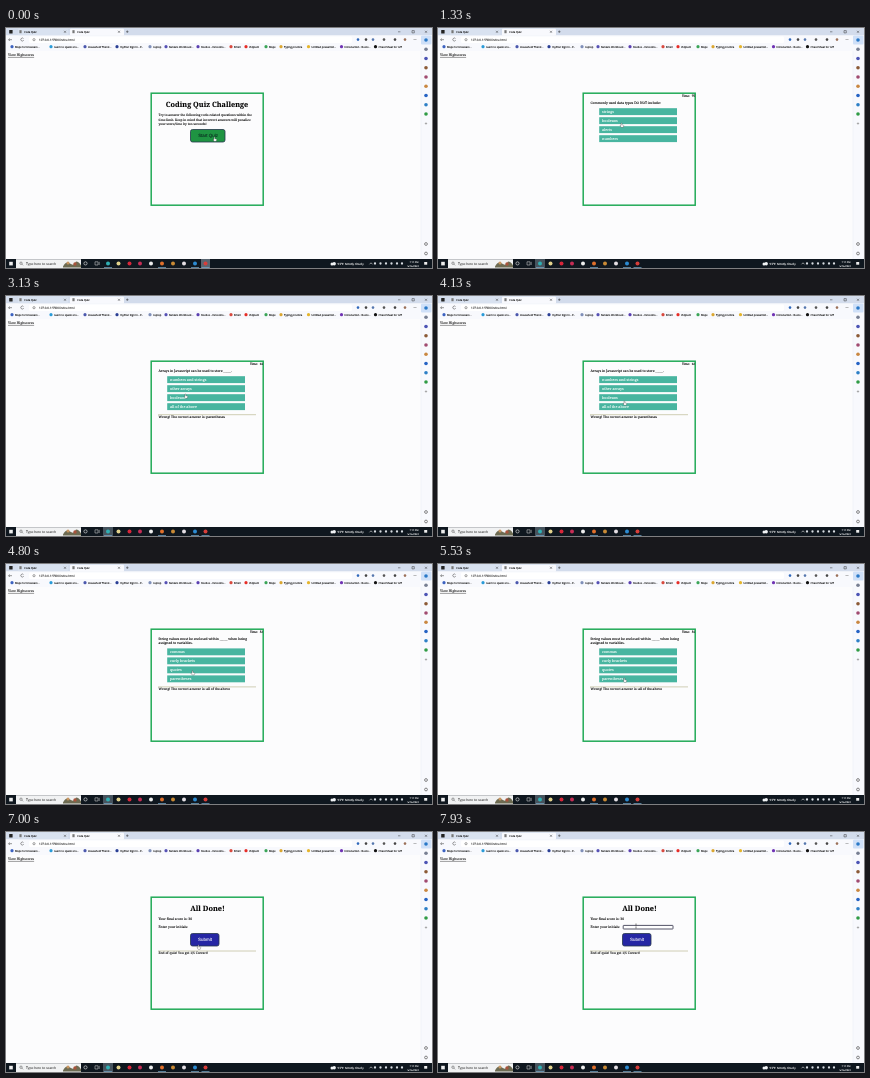
An HTML page for the animation above (8000 ms loop, 426 by 240 pixels).

```html
<!DOCTYPE html>
<html lang="en">
<head>
<meta charset="utf-8">
<title>Code Quiz</title>
<style>
  html, body { margin: 0; width: 100%; height: 100%; overflow: hidden; background: #fcfcfd; }
  svg { display: block; width: 100vw; height: 100vh; }
  text { font-family: "Noto Serif", Georgia, serif; text-rendering: geometricPrecision; white-space: pre; stroke-width: 0.09px; }
  .ui { font-family: "Open Sans", "Noto Sans", sans-serif; }
  .button { font-family: "Liberation Sans", Arial, sans-serif; }
  .title { font-weight: 700; }
</style>
</head>
<body>
<svg id="stage" viewBox="0 0 426 240" preserveAspectRatio="none"></svg>
<script>
const NS = 'http://www.w3.org/2000/svg';
const stage = document.getElementById('stage');
const LOOP = 8000;

function add(parent, tag, attrs = {}, content) {
  const node = document.createElementNS(NS, tag);
  for (const key in attrs) node.setAttribute(key, attrs[key]);
  if (content !== undefined) node.textContent = content;
  parent.appendChild(node);
  return node;
}
const group = parent => add(parent, 'g');
const rect = (p, x, y, width, height, fill, more) => add(p, 'rect', { x, y, width, height, fill, ...more });
const dot = (p, cx, cy, r, fill) => add(p, 'circle', { cx, cy, r, fill });
const ring = (p, cx, cy, r, stroke, width = 0.5) =>
  add(p, 'circle', { cx, cy, r, stroke, 'stroke-width': width, fill: 'none' });
const line = (p, d, stroke, width = 0.5, more) =>
  add(p, 'path', { d, stroke, 'stroke-width': width, fill: 'none', ...more });
const text = (p, x, y, size, str, fill = '#000', more) =>
  add(p, 'text', { x, y, 'font-size': size, fill, stroke: fill, ...more }, str);
const label = (p, x, y, str, fill = '#111', size = 2.6) => text(p, x, y, size, str, fill, { class: 'ui' });
const show = (node, on) => node.setAttribute('display', on ? 'inline' : 'none');

function drawBrowser() {
  const g = group(stage);
  rect(g, 0, 0, 426, 240, '#fcfcfd');
  rect(g, 0, 0, 426, 7.5, '#d3dcec');
  rect(g, 12, 0.8, 50, 6.7, '#d9e2f0', { rx: 1 });
  rect(g, 64, 0.8, 54, 6.9, '#f8f9fd', { rx: 1 });
  rect(g, 0, 7.5, 426, 15.5, '#f8f9fd');
  rect(g, 3.2, 2, 3.4, 3.4, '#222', { rx: 0.5 });
  for (const x of [14, 67]) {
    rect(g, x - 0.6, 2.2, 2.2, 3, '#777');
    label(g, x + 4, 4.8, 'Code Quiz');
  }
  for (const x of [59, 113, 420]) line(g, `M${x - 1} 2.8l2 2m0-2l-2 2`, '#222', 0.45);
  line(g, 'M120 3.7h2.6m-1.3-1.3v2.6M392 3.8h2.4M406 2.6h2.3v2.3h-2.3z', '#222', 0.45);

  rect(g, 23, 8.5, 323, 6.4, '#fff', { rx: 1.5 });
  line(g, 'M6 11.7h-3.4l1.2-1.2m-1.2 1.2l1.2 1.2M17.5 10.6a1.5 1.5 0 1 0 .2 1.6', '#333', 0.5);
  ring(g, 28, 11.7, 1.1, '#444');
  label(g, 33, 12.8, '127.0.0.1:5500/index.html', '#333', 2.95);
  [[352, '#2f68bb'], [360, '#444'], [367, '#5577ae'], [378, '#555'], [389, '#444'], [399, '#9a7058']]
    .forEach(([x, c]) => dot(g, x, 11.6, 1.3, c));
  for (let i = 0; i < 3; i++) dot(g, 408 + i, 11.6, 0.4, '#333');

  [
    [9, 'Maps for browsers...', '#3c62c0'], [48, 'Learn to speak a la...', '#2a9bd8'],
    [82, 'Household Thank...', '#4b58ad'], [114, 'myPlan Sign In - P...', '#2a3f94'],
    [147, 'Laptop', '#7f8fb8'], [163, 'Renters Workbook...', '#5651b4'],
    [195, 'Studios - Innovatio...', '#5a3fb0'], [228, 'Email', '#d84a3f'],
    [243, 'Vidplum', '#e62d27'], [263, 'Maps', '#3aa557'],
    [278, 'Typing practice', '#dba731'], [305.5, 'Untitled presentati...', '#e5b52c'],
    [338.5, 'Introduction · Boots...', '#7033b4'], [372.5, 'Cheat Sheet for GIT', '#111']
  ].forEach(([x, name, color]) => {
    dot(g, x - 3, 18.7, 1.6, color);
    label(g, x, 19.7, name);
  });

  rect(g, 415, 7.5, 11, 223.5, '#f8f9fd');
  rect(g, 414.8, 22.7, 0.4, 208.3, '#e4e8f2');
  rect(g, 415, 7.5, 10.5, 9, '#cfe0f8', { rx: 1 });
  ['#2978c7', '#777f92', '#4b53b4', '#8b5a36', '#a04a70', '#c98740', '#2462c4', '#2c7fc6', '#2f9b45']
    .forEach((color, i) => dot(g, 420, 12 + i * 9.25, 1.8, color));
  line(g, 'M418.8 95.5h2.4m-1.2-1.2v2.4', '#777', 0.5);
  for (const y of [216, 225.5]) ring(g, 420, y, 1.4, '#555', 0.7);

  text(g, 2, 28, 3.3, 'View Highscores', '#222', { 'text-decoration': 'underline' });
}

function drawTaskbar() {
  const g = group(stage);
  rect(g, 0, 231, 426, 9, '#0f171f');
  rect(g, 3.2, 233.8, 3.6, 3.6, '#eee');
  rect(g, 10, 231.2, 65, 8.8, '#f1f2f3');
  ring(g, 15, 235.2, 1.2, '#333', 0.45);
  line(g, 'M15.9 236.1l1.2 1.2', '#333', 0.45);
  label(g, 20, 236.7, 'Type here to search', '#444', 3.3);
  add(g, 'path', { d: 'M57 238.5q3-6 7-3t6-2q3 0 5 4v2H57z', fill: '#6d6b52' });
  dot(g, 62, 235, 1.5, '#c79560');
  dot(g, 69, 236, 1.7, '#a8533c');

  const recorder = rect(g, 195, 231, 9, 9, '#596570');
  const browser = rect(g, 97, 231, 10, 9, '#47545e');
  ring(g, 79.5, 235.4, 1.6, '#eee', 0.6);
  line(g, 'M89 233.8h3v3.2h-3zM93.2 233.8v3.2', '#ddd', 0.5);
  [[102, '#2fb0b4'], [112.5, '#e3d38c'], [123.5, '#d8263a'], [134, '#c62d55'], [145, '#eee'],
   [156, '#e0702b'], [167, '#c98a35'], [178, '#e4dfe4'], [189, '#2c8bd2'], [199.5, '#d73e39']]
    .forEach(([x, c]) => dot(g, x, 235.4, 2, c));
  for (const x of [102, 156, 189, 199.5]) rect(g, x - 4, 239.3, 8, 0.7, '#76a9cc');

  dot(g, 326, 236, 1.5, '#f1f3f5');
  dot(g, 328.2, 235.7, 1.7, '#f1f3f5');
  label(g, 331.5, 236.5, '53°F  Mostly cloudy', '#fff', 2.9);
  line(g, 'M363.5 236.3l1.5-1.5 1.5 1.5', '#eee', 0.6);
  [369, 374.5, 380, 385.5, 391, 396].forEach(x => dot(g, x, 235.5, 1.15, '#d8dde2'));
  label(g, 403.5, 234.7, '7:11 PM', '#fff', 2.4);
  label(g, 401.5, 238.5, '5/16/2022', '#fff', 2.4);
  rect(g, 418.2, 234, 3, 2.7, '#eee');
  return { recorder, browser };
}

function drawIntro() {
  const g = group(stage);
  text(g, 201, 78.8, 7.25, 'Coding Quiz Challenge', '#000', { class: 'title', 'text-anchor': 'middle' });
  ['Try to answer the following code-related questions within the',
   'time limit. Keep in mind that incorrect answers will penalize',
   'your score/time by ten seconds!']
    .forEach((row, i) => text(g, 152.5, 88.4 + i * 4.3, 3.2, row));
  drawButton(g, 35, '#1f9442', '#0b2d22', 'Start Quiz');
  return g;
}

function drawButton(g, width, fill, ink, name) {
  rect(g, 184.5, 101.5, width - 0.5, 12.5, fill, { rx: 2, stroke: '#25364c', 'stroke-width': 0.8 });
  text(g, 184.5 + width / 2, 109.4, 4.45, name, ink, { class: 'button', 'text-anchor': 'middle' });
}

function drawFeedback(g, y, message) {
  line(g, `M152 ${y}H250`, '#a9a878', 0.55);
  text(g, 152.5, y + 3.2, 3.25, message);
}

function drawQuestion({ lines, choices, feedback }) {
  const g = group(stage);
  lines.forEach((row, i) => text(g, 152.5, 75.5 + i * 4.3, 3.35, row));
  const top = 80.2 + (lines.length - 1) * 4.2;
  choices.forEach((name, i) => {
    const y = top + i * 9;
    rect(g, 161.2, y, 77.8, 6.9, '#48b5a0');
    text(g, 164, y + 4.7, 3.7, name, '#f4fdfa');
  });
  if (feedback) drawFeedback(g, top + 38.5, feedback);
  return g;
}

function drawResult() {
  const g = group(stage);
  text(g, 201.5, 78.8, 7.35, 'All Done!', '#000', { class: 'title', 'text-anchor': 'middle' });
  text(g, 152.5, 88.4, 3.3, 'Your final score is: 30');
  text(g, 152.5, 96.3, 3.3, 'Enter your initials:');
  drawButton(g, 29, '#2526a4', '#f2f2fb', 'Submit');
  drawFeedback(g, 119, 'End of quiz! You got 1/5 Correct!');
  return g;
}

const wrong = answer => `Wrong! The correct answer is: ${answer}`;
const questions = [
  { at: 930, penalty: 0, lines: ['Commonly used data types DO NOT include:'],
    choices: ['strings', 'booleans', 'alerts', 'numbers'] },
  { at: 1930, penalty: 0, lines: ['The condition in an if / else statement is enclosed', 'within _____.'],
    choices: ['quotes', 'curly brackets', 'parentheses', 'square brackets'], feedback: 'Correct!' },
  { at: 2930, penalty: 10, lines: ['Arrays in Javascript can be used to store _____.'],
    choices: ['numbers and strings', 'other arrays', 'booleans', 'all of the above'], feedback: wrong('parentheses') },
  { at: 4470, penalty: 20, lines: ['String values must be enclosed within _____ when being', 'assigned to variables.'],
    choices: ['commas', 'curly brackets', 'quotes', 'parentheses'], feedback: wrong('all of the above') },
  { at: 5800, penalty: 30, lines: ['A very useful tool used during development and', 'debugging for printing content to the debugger is:'],
    choices: ['JavaScript', 'terminal / bash', 'for loops', 'console.log'], feedback: wrong('quotes') }
];
const resultAt = 6670;
const focusAt = 7730;

drawBrowser();
const highlights = drawTaskbar();
rect(stage, 145.2, 65.2, 112, 112, '#fcfcfd', { stroke: '#22aa58', 'stroke-width': 1.5 });
const scenes = [
  { at: 0, node: drawIntro() },
  ...questions.map(q => ({ at: q.at, node: drawQuestion(q) })),
  { at: resultAt, node: drawResult() }
];
const timer = text(stage, 257, 69, 3, '', '#000', { 'text-anchor': 'end' });
const field = rect(stage, 185.2, 93.4, 49.8, 3.6, '#fff', { rx: 0.5, stroke: '#292942', 'stroke-width': 0.8 });
const hand = add(stage, 'path', {
  d: 'M0 0q.7-.4.8.4v1.3l1.5.4q.6.3.4 1l-.5 1.2H.2l-1.2-1.5q0-.6.9-.1z',
  fill: '#fff', stroke: '#222', 'stroke-width': 0.3
});
const beam = line(stage, 'M-.8-2h1.6M0-2V2M-.8 2H.8', '#333', 0.4);

// Pointer stops: time, x, y
const stops = [
  [0, 208, 109], [870, 207, 109], [1330, 183, 95], [1800, 181, 101], [2000, 181, 101],
  [2600, 177, 96], [3130, 179, 98], [4130, 186, 105], [4430, 186, 104], [5530, 186, 114],
  [5800, 186, 115], [6500, 190, 112], [7000, 192, 113], [7600, 198, 94], [8000, 198, 94]
];

function pointerAt(t) {
  const i = Math.max(1, stops.findIndex(s => s[0] > t));
  const [a, b] = [stops[i - 1], stops[i]];
  const p = (t - a[0]) / (b[0] - a[0]);
  const e = p * p * (3 - 2 * p);
  return [a[1] + (b[1] - a[1]) * e, a[2] + (b[2] - a[2]) * e];
}

function render(t) {
  const current = scenes.filter(s => s.at <= t).pop();
  scenes.forEach(s => show(s.node, s === current));
  const question = questions[scenes.indexOf(current) - 1];
  show(timer, question);
  if (question)
    timer.textContent = `Time:  ${75 - Math.floor((t - questions[0].at) / 1000) - question.penalty}`;
  show(field, t >= focusAt);
  show(highlights.recorder, t < 400);
  show(highlights.browser, t >= 400);

  const [x, y] = pointerAt(t);
  const overField = t > 7400;
  [[beam, overField], [hand, !overField]].forEach(([node, on]) => {
    show(node, on);
    node.setAttribute('transform', `translate(${x} ${y})`);
  });
}

const start = performance.now();
function tick() {
  render((performance.now() - start) % LOOP);
  requestAnimationFrame(tick);
}
tick();
</script>
</body>
</html>
```
